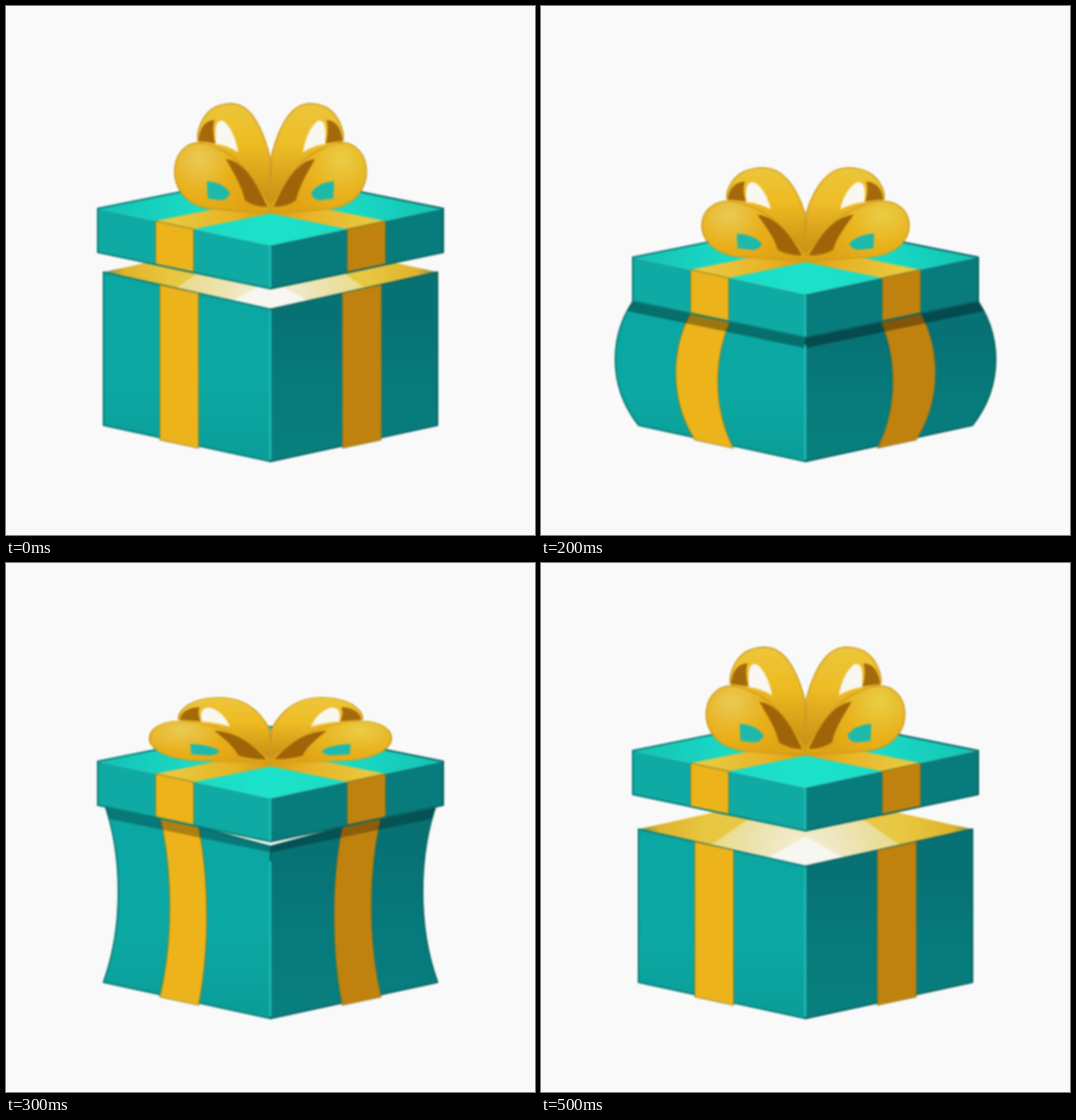
These frames come from a looping animation (640 by 640 pixels, 0.6 s). An HTML page with a canvas:

```html
<!DOCTYPE html>
<html>
<head>
<meta charset="utf-8">
<title>Bouncing gift box</title>
<style>
  html, body { margin: 0; height: 100%; overflow: hidden; background: #f9f9f9; }
  canvas { display: block; width: 100vw; height: 100vh; filter: blur(1.2px); }
</style>
</head>
<body>
<canvas width="640" height="640"></canvas>
<script>
const ctx = document.querySelector('canvas').getContext('2d');
const STEP = 100;
const WIDE = 202; // half width of the box

// lid: lid offset; corner, front: heights of the box rim; bulge, band: sideways
// bend of the wall and its ribbon; sx, sy: bow stretch; shade: shadow below the lid
const poses = [
  { lid: 0,   corner: 322, front: 367, bulge: 0,   band: 0,   sx: 1,     sy: 1,    shade: 0 },
  { lid: 44,  corner: 335, front: 378, bulge: 20,  band: 14,  sx: .985,  sy: 1.01, shade: .34 },
  { lid: 59,  corner: 348, front: 392, bulge: 28,  band: 21,  sx: 1.08,  sy: .85,  shade: .34 },
  { lid: -5,  corner: 288, front: 343, bulge: -18, band: -11, sx: 1.26,  sy: .6,   shade: .28 },
  { lid: -41, corner: 302, front: 353, bulge: -12, band: -6,  sx: 1.155, sy: .77,  shade: 0 },
  { lid: -18, corner: 322, front: 367, bulge: 0,   band: 0,   sx: 1.035, sy: .985, shade: 0 }
];

// Each half is drawn in coordinates measured outward from the middle.
const sides = [
  { dir: -1, wall: ['#0ba7a3', '#0ca8a3', '#0b9d98'], lid: '#0faaa4', ribbon: '#edb31a',
    edge: '#0a7f7a', loop: '#eebb22', curl: '#e9b01b', shine: '#e9c850' },
  { dir: 1, wall: ['#077174', '#077a7c', '#097f7e'], lid: '#087b7d', ribbon: '#c0820f',
    edge: '#0a6665', loop: '#eebd27', curl: '#e9b31d', shine: '#eacb42' }
];

const bow = {
  loop: new Path2D('M0 0L1 -60C7 -84 20 -123 47 -124C70 -124 80 -111 85 -98Q89 -88 88 -79L66 -68L30 -30Z'),
  gap: new Path2D('M57 -103C68 -106 67 -88 66 -75Q54 -74 39 -65C42 -82 48 -96 57 -103Z'),
  fold: new Path2D('M87 -79C86 -95 78 -104 68 -104Q71 -92 67 -76Z'),
  curl: new Path2D('M0 0C16 -28 38 -60 62 -69C78 -78 94 -79 103 -71C117 -61 118 -40 114 -28C107 -7 88 4 62 4Q30 8 0 7Z'),
  hole: new Path2D('M77 -30Q58 -29 49 -16Q51 -8 59 -7L76 -9Z'),
  tail: new Path2D('M54 -57C36 -54 21 -38 4 1Q20 1 31 -7C35 -24 41 -34 54 -57Z')
};

function poly(...pts) {
  const p = new Path2D();
  for (let i = 0; i < pts.length; i += 2) p.lineTo(pts[i], pts[i + 1]);
  p.closePath();
  return p;
}

function paint(path, fill, line, width = 1.5) {
  ctx.fillStyle = fill;
  ctx.fill(path);
  if (line) outline(path, line, width);
}

function outline(path, line, width) {
  ctx.strokeStyle = line;
  ctx.lineWidth = width;
  ctx.stroke(path);
}

function fade(gradient, ...stops) {
  for (let i = 0; i < stops.length; i += 2) gradient.addColorStop(stops[i], stops[i + 1]);
  return gradient;
}

// Upright strip of the box between two distances, bent sideways.
function strip(pose, near, far, bendNear, bendFar, drop = 0) {
  const top = x => pose.front + (pose.corner - pose.front) * x / WIDE;
  const base = x => 551 + drop - x * .217;
  const p = new Path2D();
  const curve = (x, bend, y0, y1) => {
    const cx = x + bend * 4 / 3, h = y1 - y0;
    p.lineTo(x, y0);
    p.bezierCurveTo(cx, y0 + h * .3, cx, y0 + h * .7, x, y1);
  };
  curve(near, bendNear, top(near), base(near));
  curve(far, bendFar, base(far), top(far));
  p.closePath();
  return p;
}

function drawInside({ corner, front }) {
  const slope = (front - corner) / WIDE;
  const gold = fade(ctx.createLinearGradient(0, 0, WIDE, 0),
    0, '#e9cf55', .6, '#e8c63f', .88, '#dfb32c', 1, '#6a8a48');
  const cream = fade(ctx.createRadialGradient(0, front - 10, 20, 0, front - 10, 115),
    0, '#f2ecd0', .5, '#ece2ac', 1, '#eadb88');
  paint(poly(0, front, WIDE, corner, 0, 2 * corner - front), gold);
  paint(poly(0, front, 115, front - 115 * slope, 72, front - 55, 0, front - 70), cream);
  paint(poly(0, front, 46, front - 46 * slope, 0, front - 36), '#f7f6f0');
}

function drawBox(pose, s) {
  const { front, lid, band, shade } = pose;
  const wall = strip(pose, 0, WIDE, 0, pose.bulge);
  const tint = fade(ctx.createLinearGradient(0, front, 0, 551),
    0, s.wall[0], .5, s.wall[1], 1, s.wall[2]);

  drawInside(pose);
  paint(wall, tint, s.edge, 2);
  paint(strip(pose, 87, 134, band * .9, band * 1.1, 3), s.ribbon, 'rgba(120,110,30,.5)');
  if (shade) {
    ctx.save();
    ctx.clip(wall);
    paint(poly(0, 342 + lid, 240, 291 + lid, 240, 305 + lid, 0, 355 + lid), `rgba(0,0,0,${shade})`);
    ctx.restore();
  }
}

function drawLid(s) {
  const top = fade(ctx.createLinearGradient(0, 270, 209, 245),
    0, '#1de2ca', .4, '#1bdcc7', 1, '#13c2b3');
  const gold = fade(ctx.createLinearGradient(0, 240, 120, 262),
    0, '#d99b12', .4, '#e8b426', 1, '#e9c840');
  paint(poly(0, 290, 209, 245, 0, 203), top);
  paint(poly(93, 270, 139, 260, 0, 232, 0, 251), gold);
  paint(poly(0, 290, 209, 245, 209, 298, 0, 342), s.lid);
  paint(poly(93, 270, 139, 260, 139, 313, 93, 323), s.ribbon, 'rgba(120,110,30,.5)');
  outline(new Path2D('M0 203L209 245V298L0 342'), s.edge, 2);
}

function drawBow(s) {
  const rim = '#cc9b20';
  const loop = fade(ctx.createLinearGradient(0, -124, 0, 0),
    0, '#ecc63a', .4, s.loop, 1, '#c98d12');
  const curl = fade(ctx.createRadialGradient(86, -58, 4, 86, -50, 75),
    0, s.shine, .5, s.curl, 1, '#dfa313');
  paint(bow.loop, loop, rim);
  paint(bow.gap, '#f8f7f0');
  paint(bow.fold, '#a4690b');
  paint(bow.curl, curl, rim);
  paint(bow.hole, '#1fb9ab');
  paint(bow.tail, '#9f6408');
}

function bothHalves(draw) {
  for (const s of sides) {
    ctx.save();
    ctx.scale(s.dir, 1);
    draw(s);
    ctx.restore();
  }
}

function seam(y0, y1) {
  ctx.fillStyle = '#21bcb0';
  ctx.fillRect(-1.5, y0, 2.5, y1 - y0);
}

function draw(pose) {
  ctx.fillStyle = '#f9f9f9';
  ctx.fillRect(0, 0, 640, 640);
  ctx.save();
  ctx.translate(320, 0);
  ctx.lineJoin = 'round';
  bothHalves(s => drawBox(pose, s));
  seam(pose.front + (pose.shade ? 18 : 1), 549);
  ctx.translate(0, pose.lid);
  bothHalves(drawLid);
  seam(291, 341);
  ctx.translate(0, 242);
  ctx.scale(pose.sx, pose.sy);
  bothHalves(drawBow);
  ctx.restore();
}

const start = performance.now();
function tick() {
  const t = performance.now() - start;
  draw(poses[Math.floor(t / STEP) % poses.length]);
  requestAnimationFrame(tick);
}
tick();
</script>
</body>
</html>
```
